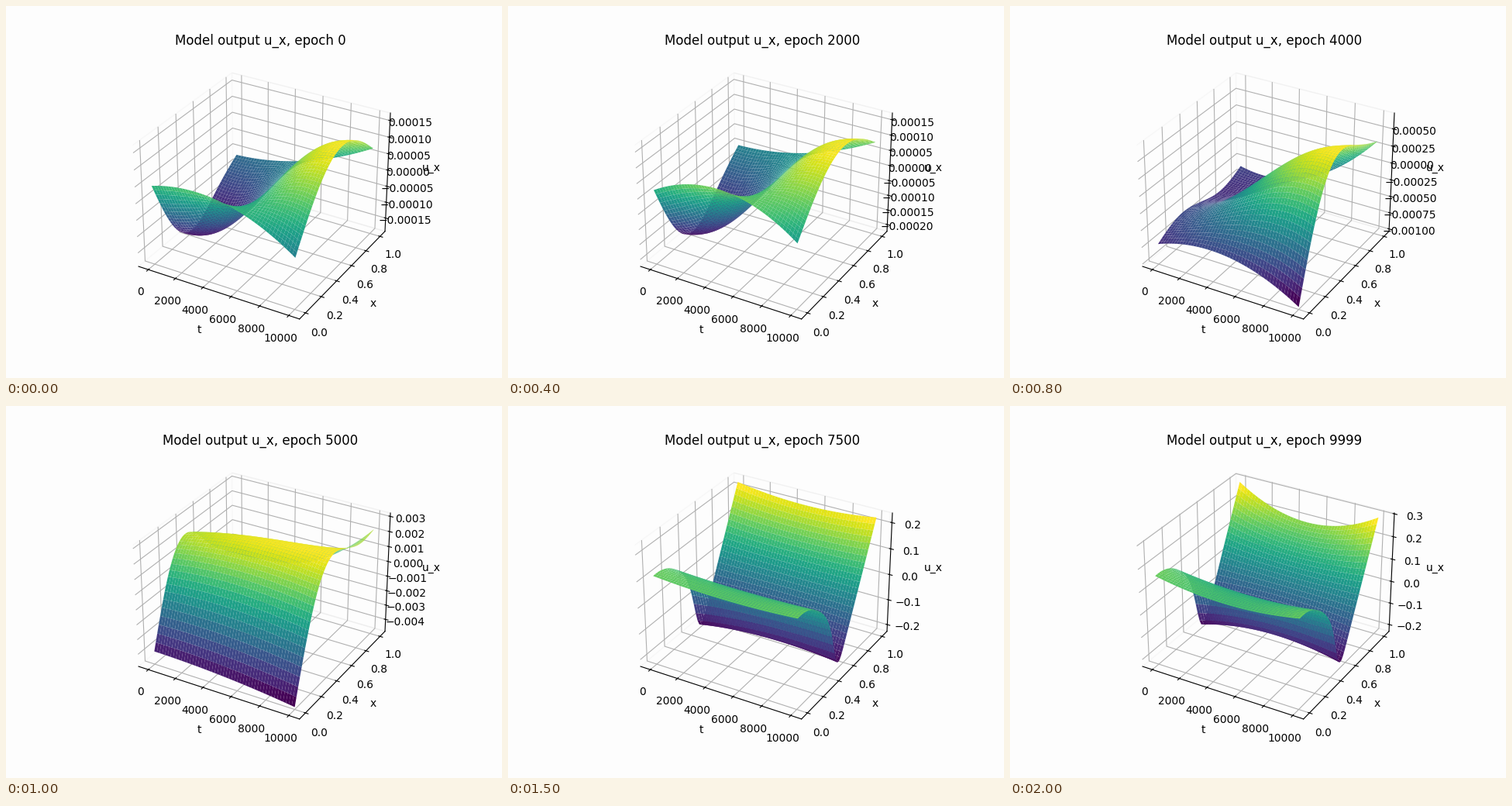
A matplotlib script for the animation above (2.1 s loop, 640 by 480 pixels).

```python
import numpy as np
import matplotlib.pyplot as plt
from matplotlib.animation import FuncAnimation

FRAMES, INTERVAL = 21, 100
PAPER = "#fdfdfd"

s = np.linspace(0, 1, 51)
T, X = np.meshgrid(s, s, indexing="ij")
ARCH = 4 * T * (1 - T)
SWING = (1 - np.cos(np.pi * (1.1 * T - 0.1))) / 2


def unit(z):
    return (z - z.min()) / (z.max() - z.min())


def mix(a, b, k):
    return a + (b - a) * k


def wave(near, far, belly, skew):
    """Two edges (start, end, arch along t) joined by two sine harmonics in x."""
    x0, x1 = (mix(a, b, T) + arch * ARCH for a, b, arch in (near, far))
    first = mix(*belly[:2], SWING) + belly[2] * ARCH
    second = mix(*skew, T)
    return unit(mix(x0, x1, X) + first * np.sin(np.pi * X)
                + second * np.sin(2 * np.pi * X))


def valley(zero, sag, sag_back=0.0):
    """Hump, steep drop and straight climb along x, flattened halfway along t."""
    hump = 0.735 + 0.15 * X - 2.1 * X**2
    climb = 0.44 + 2.2 * (X - 0.75)
    step = 1 / (1 + np.exp((0.47 + 0.02 * T - X) / 0.03))
    z = unit(mix(hump, climb, step))
    return unit(mix(z, zero, (sag + sag_back * X**4) * ARCH))


# step, lowest value, highest value, normalised shape
KEYS = [
    (0, -0.000185, 0.000165, wave((0.66, 0.43, 0.15), (0.36, 0.73, -0.08),
                                  (-0.49, 0.39, 0), (-0.1, 0))),
    (2, -0.000217, 0.000170, wave((0.60, 0.57, 0.20), (0.45, 0.79, -0.08),
                                  (-0.50, 0.31, 0), (-0.1, 0))),
    (6, -0.000214, 0.000158, wave((0.67, 0.54, 0.20), (0.46, 0.79, -0.08),
                                  (-0.52, 0.31, 0), (-0.1, 0))),
    (10, -0.00468, 0.00306, wave((0.09, 0.0, 0.02), (0.43, 0.87, -0.22),
                                 (0.54, 0.53, 0.13), (0.19, 0.16))),
    (13, -0.1816, 0.1736, valley(0.51, 0.03)),
    (15, -0.218, 0.227, valley(0.49, 0.10)),
    (20, -0.221, 0.293, valley(0.43, 0.20, 0.15)),
]


def state(i):
    """Blend neighbouring keys; the value range grows geometrically."""
    for (i0, lo0, hi0, z0), (i1, lo1, hi1, z1) in zip(KEYS, KEYS[1:]):
        if i <= i1:
            break
    k = (i - i0) / (i1 - i0)
    lo = lo0 * (lo1 / lo0) ** k
    hi = hi0 * (hi1 / hi0) ** k
    return lo, hi, mix(lo, hi, unit(mix(z0, z1, k)))


fig = plt.figure(figsize=(6.4, 4.8), dpi=100, facecolor=PAPER)
ax = fig.add_subplot(projection="3d", facecolor=PAPER)
for axis in (ax.xaxis, ax.yaxis, ax.zaxis):
    axis.pane.set_fill(False)
ax.set(xlabel="t", ylabel="x", zlabel="u_x")
surfaces = []


def update(i):
    while surfaces:
        surfaces.pop().remove()
    lo, hi, z = state(i)
    surfaces.append(ax.plot_surface(T * 10000, X, z, cmap="viridis",
                                    rstride=1, cstride=1))
    side, pad = 0.0729, (hi - lo) / 48
    ax.set_xlim(-10000 * side, 10000 * (1 + side))
    ax.set_ylim(-side, 1 + side)
    ax.set_zlim(lo - pad, hi + pad)
    ax.set_title(f"Model output u_x, epoch {min(500 * i, 9999)}")
    return surfaces


anim = FuncAnimation(fig, update, frames=FRAMES, interval=INTERVAL,
                     init_func=lambda: update(0), repeat=True, repeat_delay=0)
plt.show()
```
